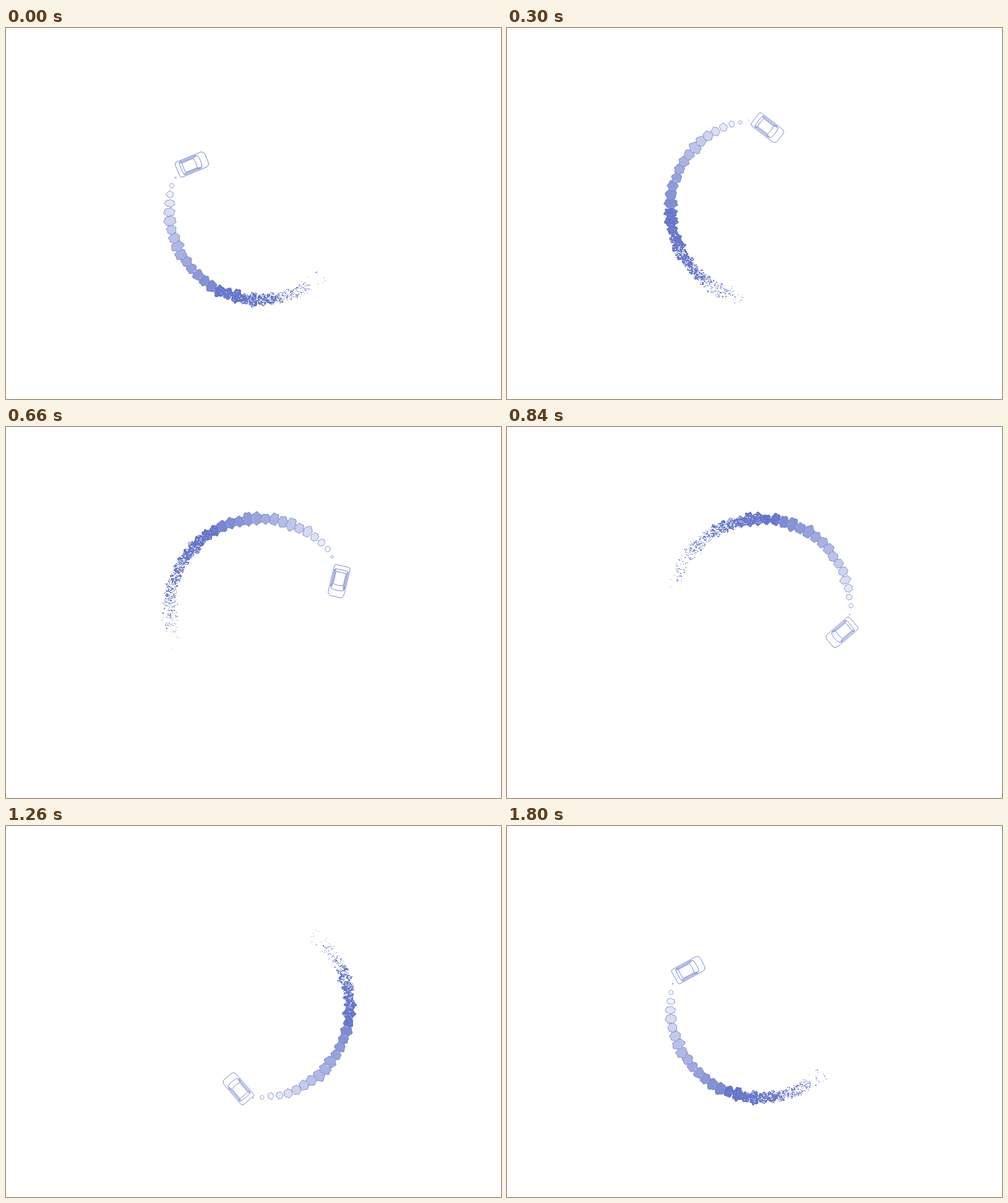
An HTML page with a canvas for the animation above (1.83 s loop, 800x600 px).

```html
<!DOCTYPE html>
<html lang="en">
<head>
<meta charset="utf-8">
<title>Drifting car</title>
<style>
  html, body { margin: 0; width: 100%; height: 100%; overflow: hidden; background: #fff; }
  canvas { display: block; }
</style>
</head>
<body>
<canvas id="stage" width="800" height="600"></canvas>
<script>
const ctx = document.getElementById('stage').getContext('2d');
const LOOP = 1830, TICK = 30;
const INK = [91, 108, 196];
const LINE = `rgb(${INK})`;
const PUFFS = 64, FADE_AGE = 15;
const rad = deg => deg * Math.PI / 180;
const clamp = (v, lo, hi) => Math.min(hi, Math.max(lo, v));

function rnd(a, b = 0, c = 0) {
  const v = Math.sin(a * 12.9898 + b * 78.233 + c * 37.719) * 43758.5453;
  return v - Math.floor(v);
}

function tint(amount) {
  return `rgb(${INK.map(c => Math.round(255 + (c - 255) * amount))})`;
}

// Steps of 6 degrees, with two short holds and one catch-up.
function stepAt(ms) {
  const slot = Math.floor((ms % LOOP) / TICK);
  return slot - (slot > 10) - (slot > 42) + clamp((slot - 30) / 10, 0, 1);
}

const puffs = Array.from({ length: PUFFS }, (_, k) => {
  const deg = 200.8 + k * 360 / PUFFS;
  const angle = rad(deg);
  const r = 145.5 + (rnd(k, 1) - 0.5) * 2.5;
  return {
    k, angle,
    x: 409.5 + r * Math.cos(angle),
    y: 293.5 + r * Math.sin(angle),
    out: 8 + 3.5 * rnd(k, 2) ** 2,
    along: 7.6 + 1.2 * rnd(k, 3),
    lobes: 5 + Math.floor(rnd(k, 4) * 3),
    turn: rnd(k, 5) * 6.28,
    life: 28 - 2.7 * Math.cos(angle - rad(340)) + rnd(k, 6) * 1.5
  };
});

const growth = age => 1 - Math.exp(-(age + 0.05) / 2.6);
const edge = (p, a) => 1 + 0.09 * Math.cos(p.lobes * a + p.turn);

function outline(p, age) {
  const path = new Path2D();
  const g = growth(age), c = Math.cos(p.angle), s = Math.sin(p.angle);
  for (let i = 0; i < 40; i++) {
    const a = i / 40 * Math.PI * 2, e = edge(p, a) * g;
    const u = p.out * e * Math.cos(a), v = p.along * e * Math.sin(a);
    path.lineTo(p.x + u * c - v * s, p.y + u * s + v * c);
  }
  path.closePath();
  return path;
}

function drawCloud(p, age, path) {
  ctx.fillStyle = tint(0.9 * clamp((age - 1.5) / 15, 0, 1) ** 0.8);
  ctx.fill(path);
  ctx.strokeStyle = LINE;
  ctx.lineWidth = 0.75;
  ctx.stroke(path);
}

// The cloud breaks into single grains that thin out with age.
function drawGrains(p, age) {
  const q = (age - FADE_AGE) / (p.life - FADE_AGE);
  const c = Math.cos(p.angle), s = Math.sin(p.angle);
  const out = p.out * (1 + 0.3 * q), along = p.along * (1 + 0.1 * q);
  const size = Math.ceil(out * 1.1) + 1;
  const x0 = Math.round(p.x), y0 = Math.round(p.y);
  for (let y = -size; y <= size; y++) {
    for (let x = -size; x <= size; x++) {
      const u = (x * c + y * s) / out, v = (y * c - x * s) / along;
      if (Math.hypot(u, v) > edge(p, Math.atan2(v, u))) continue;
      const grain = rnd(x, y, p.k);
      const clump = rnd(Math.floor(x / 3), Math.floor(y / 2), p.k + 0.5);
      if ((grain + clump) / 2 > 1 - q) continue;
      ctx.fillStyle = tint(rnd(x, y, p.k + 0.3) < 0.25 ? 0.78 : 0.95);
      ctx.fillRect(x0 + x, y0 + y, 1, 1);
    }
  }
}

function drawSmoke(step) {
  const head = step * PUFFS / 60 + 0.35;
  const live = puffs
    .map(p => ({ p, age: (head - p.k + PUFFS) % PUFFS }))
    .filter(o => o.age < o.p.life)
    .sort((a, b) => b.age - a.age);
  let prev = null;
  for (const { p, age } of live) {
    if (age >= FADE_AGE) {
      drawGrains(p, age);
      prev = outline(p, age);
      continue;
    }
    const path = outline(p, age);
    drawCloud(p, age, path);
    if (prev && age > 4) {
      ctx.save();
      ctx.clip(prev);
      ctx.fillStyle = `rgba(255,255,255,${0.12 + 0.2 * rnd(p.k, 9)})`;
      ctx.fill(path);
      ctx.restore();
    }
    prev = path;
  }
}

const body = new Path2D();
body.roundRect(-25.5, -13, 51, 26, [3, 6, 6, 3]);
const trim = new Path2D(
  'M13 -10.5 Q17 0 13 10.5 L5.5 8.5 Q8 0 5.5 -8.5 Z' +
  'M5 -8.3 L-14.5 -8.3 Q-15.5 0 -14.5 8.3 L5 8.3' +
  'M-14.5 -8.3 L-18.5 -10.3 Q-20 0 -18.5 10.3 L-14.5 8.3' +
  'M11 -11.3 L4.5 -9.6 L-13.5 -9.6 L-17.5 -11.3 Z' +
  'M11 11.3 L4.5 9.6 L-13.5 9.6 L-17.5 11.3 Z');

function drawCar(step) {
  const deg = 214 + step * 6, a = rad(deg);
  ctx.save();
  ctx.translate(412 + 134.2 * Math.cos(a), 295.5 + 134.2 * Math.sin(a));
  ctx.rotate(rad(deg + 123.5));
  ctx.fillStyle = '#fff';
  ctx.strokeStyle = LINE;
  ctx.lineWidth = 0.75;
  ctx.fill(body);
  ctx.stroke(body);
  ctx.stroke(trim);
  ctx.restore();
}

const start = performance.now();
function frame() {
  const step = stepAt(performance.now() - start);
  ctx.fillStyle = '#fff';
  ctx.fillRect(0, 0, 800, 600);
  drawSmoke(step);
  drawCar(step);
  requestAnimationFrame(frame);
}
frame();
</script>
</body>
</html>
```
